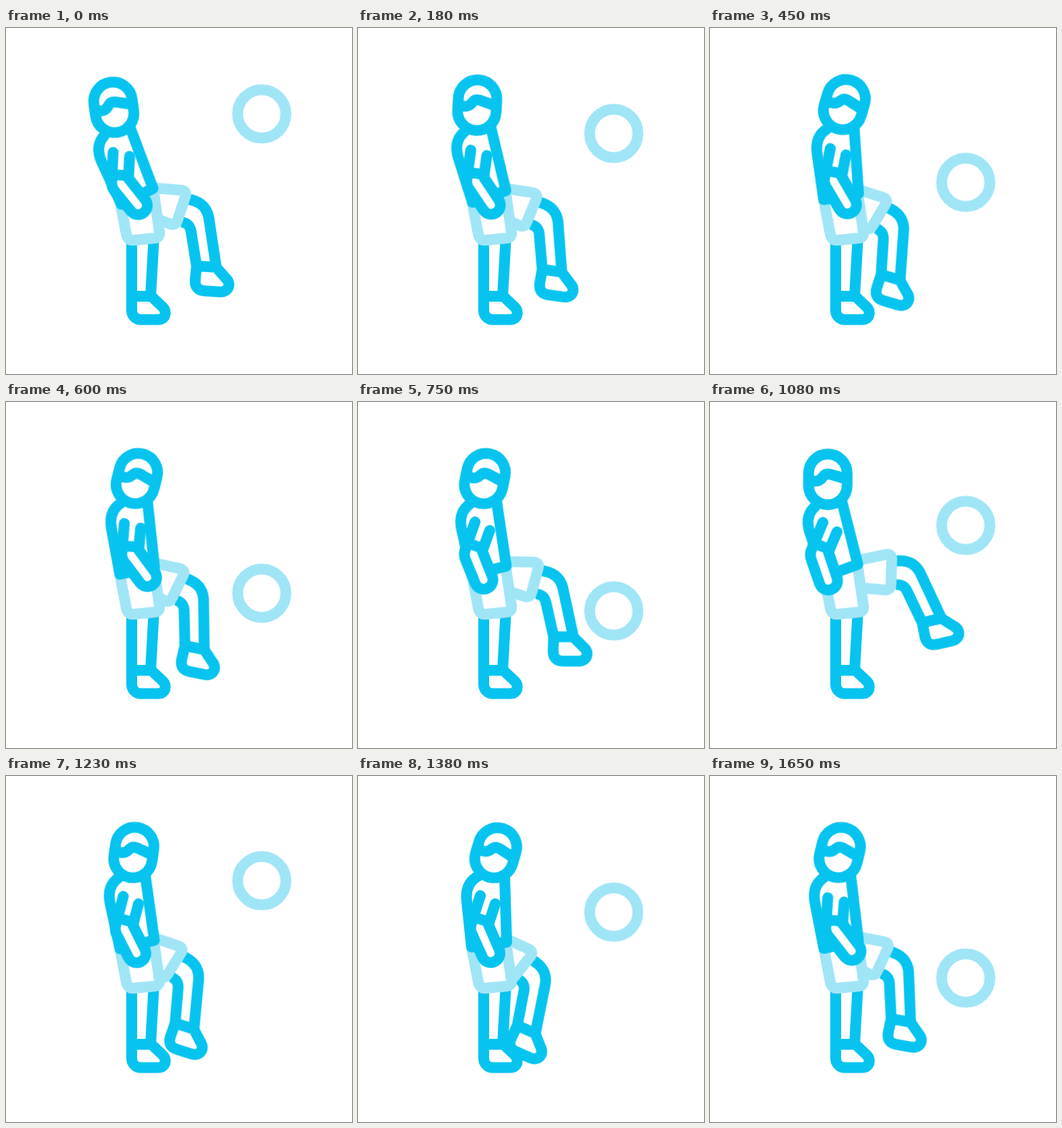
These frames come from a looping animation (512 px wide and 512 px high, 1680 ms). An HTML page without scripts:

```html
<!DOCTYPE html>
<html lang="en">
<head>
<meta charset="utf-8">
<title>Ball juggling</title>
<style>
  html, body { margin: 0; width: 100%; height: 100%; overflow: hidden; background: #fff; }
  svg { display: block; width: 100%; height: 100%; }

  path, circle, rect { fill: none; stroke: #06c4ef; stroke-width: 16; stroke-linecap: round; stroke-linejoin: round; }
  .light { stroke: #a0e5f6; }
  .solid { fill: #fff; }
  .butt { stroke-linecap: butt; }

  #ball, #leg, #torso, #head, #arm { animation: 1680ms linear infinite; }
  #ball { animation-name: ball; }
  #leg { animation-name: leg; transform-origin: 210px 229px; }
  #torso { animation-name: torso; transform-origin: 193px 249px; }
  #head { animation-name: head; transform-origin: 174.3px 114.5px; }
  #arm { animation-name: arm; transform-origin: 191px 182px; }

  @keyframes ball {
    0% { transform: translateY(127px); animation-timing-function: cubic-bezier(.4, .25, .7, .65); }
    10.71%, 14.2% { transform: translateY(156px); }
    26.79% { transform: translateY(228px); }
    38.39% { transform: translateY(299px); animation-timing-function: ease-out; }
    44.64% { transform: translateY(309px); animation-timing-function: ease-out; }
    47% { transform: translateY(312px); animation-timing-function: cubic-bezier(.4, 0, .75, .75); }
    64.29% { transform: translateY(183px); animation-timing-function: cubic-bezier(.3, .5, .6, 1); }
    70.8% { transform: translateY(152px); animation-timing-function: cubic-bezier(.4, 0, .7, .6); }
    82.14% { transform: translateY(201px); }
    92.86% { transform: translateY(269px); animation-timing-function: step-end; }
    98.2%, 100% { transform: translateY(299px); }
  }

  @keyframes leg {
    0% { transform: rotate(0deg); }
    10.71%, 14.2% { transform: rotate(4.3deg); animation-timing-function: ease-in-out; }
    20% { transform: rotate(23deg); animation-timing-function: ease-in; }
    22.32% { transform: rotate(20deg); }
    26.79% { transform: rotate(12.7deg); }
    38.39% { transform: rotate(6.3deg); }
    44.64% { transform: rotate(-3.4deg); animation-timing-function: ease-out; }
    56% { transform: rotate(-19deg); animation-timing-function: ease-in; }
    64.29% { transform: rotate(-16.7deg); }
    70.54% { transform: rotate(4.3deg); animation-timing-function: ease-out; }
    78.5% { transform: rotate(23.5deg); animation-timing-function: ease-in-out; }
    82.14% { transform: rotate(20deg); }
    92.86% { transform: rotate(11.6deg); animation-timing-function: step-end; }
    98.2%, 100% { transform: rotate(6.3deg); }
  }

  @keyframes torso {
    0% { transform: rotate(-18.9deg); }
    10.71%, 14.2% { transform: rotate(-11.6deg); animation-timing-function: ease-out; }
    22.32% { transform: rotate(0deg); animation-timing-function: ease-in; }
    26.79% { transform: rotate(-2.1deg); }
    38.39% { transform: rotate(-5deg); }
    44.64% { transform: rotate(-6.8deg); animation-timing-function: ease-in-out; }
    58.5% { transform: rotate(-17.5deg); animation-timing-function: ease-in; }
    64.29% { transform: rotate(-12.5deg); }
    82.14% { transform: rotate(0deg); animation-timing-function: ease-in-out; }
    92.86% { transform: rotate(-3.4deg); animation-timing-function: step-end; }
    98.2%, 100% { transform: rotate(-5deg); }
  }

  @keyframes head {
    0% { transform: rotate(-1.5deg); }
    10.71%, 14.2% { transform: rotate(2.5deg); }
    26.79%, 44.64% { transform: rotate(6deg); animation-timing-function: ease-in-out; }
    58.5%, 64.29% { transform: rotate(0deg); }
    82.14% { transform: rotate(4deg); }
    92.86% { transform: rotate(6deg); }
    100% { transform: rotate(6deg); }
  }

  @keyframes arm {
    0% { transform: rotate(3.9deg); }
    10.71%, 14.2% { transform: rotate(1.5deg); }
    22.32% { transform: rotate(0deg); }
    26.79% { transform: rotate(-4.5deg); animation-timing-function: ease-out; }
    38.39% { transform: rotate(-9deg); animation-timing-function: ease-in; }
    44.64% { transform: rotate(8.5deg); animation-timing-function: ease-out; }
    57% { transform: rotate(18.5deg); }
    64.29% { transform: rotate(17.5deg); }
    70.54% { transform: rotate(5deg); animation-timing-function: ease-out; }
    82.14% { transform: rotate(0deg); }
    92.86% { transform: rotate(-6deg); animation-timing-function: step-end; }
    98.2%, 100% { transform: rotate(-9deg); }
  }
</style>
</head>
<body>
<svg viewBox="0 0 512 512">
  <circle id="ball" class="light" cx="378.5" r="35.7"/>

  <!-- kicking leg -->
  <g id="leg">
    <path class="butt" d="M268 253C288 256 297 266 300 280L311 353M260 287C270 289 273 294 274 302L282 352"/>
    <path d="M282 352L280 373Q279 388 294 389L317 390.5C329 391 334 379 326 371L311 354Z"/>
    <path class="light" d="M222 237L259 240Q268 241 265.500 249L254 284Q251 293 243 290L215 279"/>
  </g>

  <!-- standing leg -->
  <path class="solid" d="M186 316V397H214L218.500 316"/>
  <path class="solid" d="M186 397V418A13.500 13.500 0 0 0 199.500 431.500H225C236 431.500 239 420 232 413L215 397Z"/>

  <path class="light solid" d="M169 258L178 305Q180 315 189 314L220 311Q228 310 227 302L219 246"/>

  <g id="torso">
    <path d="M178 148C163 156 159 170 161 186L168 253L220 246L217 148"/>
    <g transform="rotate(12.5 193 249)">
      <g id="head">
        <rect class="solid" x="145.800" y="77" width="57" height="75" rx="28.500"/>
        <path d="M150 117C171 120 163 103 178 107L202 114"/>
      </g>
    </g>
    <g id="arm">
      <path class="solid" d="M181 177L167 221Q166 227 168 232L184 268C192 284 215 274 209 257L193 220L203 189"/>
      <path d="M172 209L194 216"/>
    </g>
  </g>
</svg>
</body>
</html>
```
